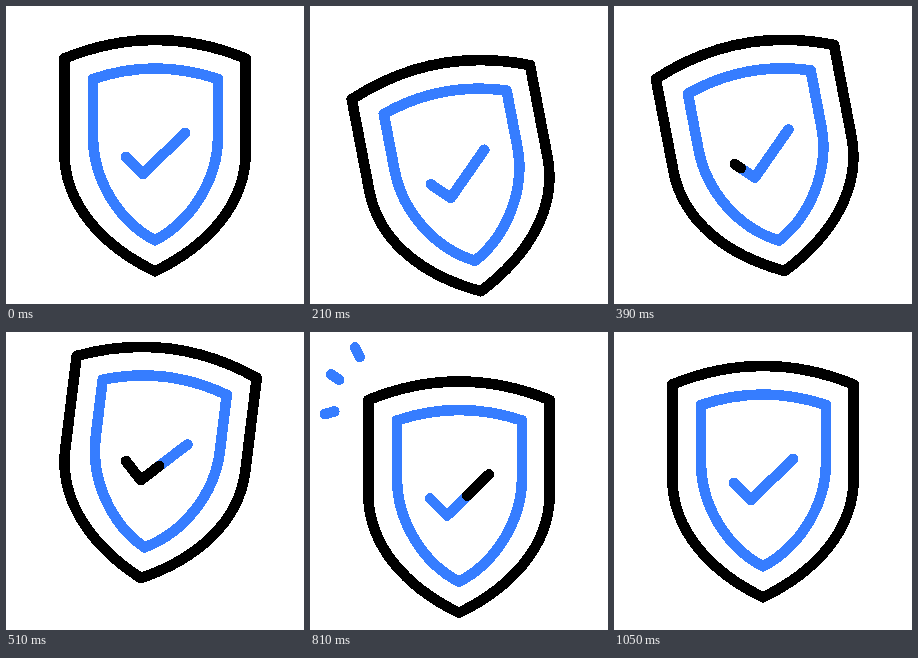
These frames come from a looping animation (298x298 px, 1500 ms). An HTML page:

```html
<!DOCTYPE html>
<html lang="en">
<head>
<meta charset="utf-8">
<title>Shield</title>
<style>
  html, body { margin: 0; height: 100%; overflow: hidden; background: #fff; }
  svg { display: block; width: 100%; height: 100%; shape-rendering: crispEdges; }
  path { fill: none; stroke: #367dff; stroke-width: 10.6; stroke-linecap: round; stroke-linejoin: round; }
  .dark { stroke: #000; }
</style>
</head>
<body>
<svg viewBox="0 0 298 298">
  <g id="shield">
    <path class="spark" pathLength="1" d="M60 30L45 0"/>
    <path class="spark" pathLength="1" d="M47 43.5L21 27"/>
    <path class="spark" pathLength="1" d="M44.5 58.5L15 66.5"/>
    <path class="dark" d="M58.3 52.5Q149 15.5 239.7 52.5V146C239.7 199 201 240 149 265.3C97 240 58.3 199 58.3 146Z"/>
    <path d="M87 73Q149 52 212 73V130C212 174 185 215.5 149 234.3C113 215.5 87 174 87 130Z"/>
    <path d="M120 151L137 168L179 127"/>
    <path id="sweep" class="dark" pathLength="1" d="M120 151L137 168L179 127"/>
  </g>
</svg>
<script>
const STEP = 30, LOOP = 1500;
const shield = document.getElementById('shield');
const sweep = document.getElementById('sweep');
const sparks = document.querySelectorAll('.spark');

// Keyframes are [step, value] pairs, eased in and out
const bounce = [[0, 0], [8, 23], [18, -19.5], [27, 15.5], [35, 0]];
const tilt = [[0, 0], [11, -15.5], [18, 8.3], [23, -2.8], [27, 0]];

function ease(from, to, t) {
  const u = Math.min(1, Math.max(0, (t - from) / (to - from)));
  return u * u * (3 - 2 * u);
}

function valueAt(keys, t) {
  let value = keys[0][1];
  for (let i = 1; i < keys.length; i++) {
    const [t0, v0] = keys[i - 1], [t1, v1] = keys[i];
    value += (v1 - v0) * ease(t0, t1, t);
  }
  return value;
}

// Show only the part of a path between two fractions of its length
function trim(path, start, end) {
  const length = end - start;
  path.style.display = length > 0.001 ? '' : 'none';
  path.setAttribute('stroke-dasharray', `${length} 9`);
  path.setAttribute('stroke-dashoffset', -start);
}

function draw(now) {
  const t = Math.floor(now % LOOP / STEP);
  shield.setAttribute('transform',
    `translate(0 ${valueAt(bounce, t)}) rotate(${valueAt(tilt, t)} 149 149)`);
  trim(sweep, ease(20.5, 31.5, t), ease(11, 22, t));
  sparks.forEach(s => trim(s, ease(22, 30, t), ease(20, 27, t)));
}

const begin = performance.now();
function tick() {
  draw(performance.now() - begin);
  requestAnimationFrame(tick);
}
tick();
</script>
</body>
</html>
```
